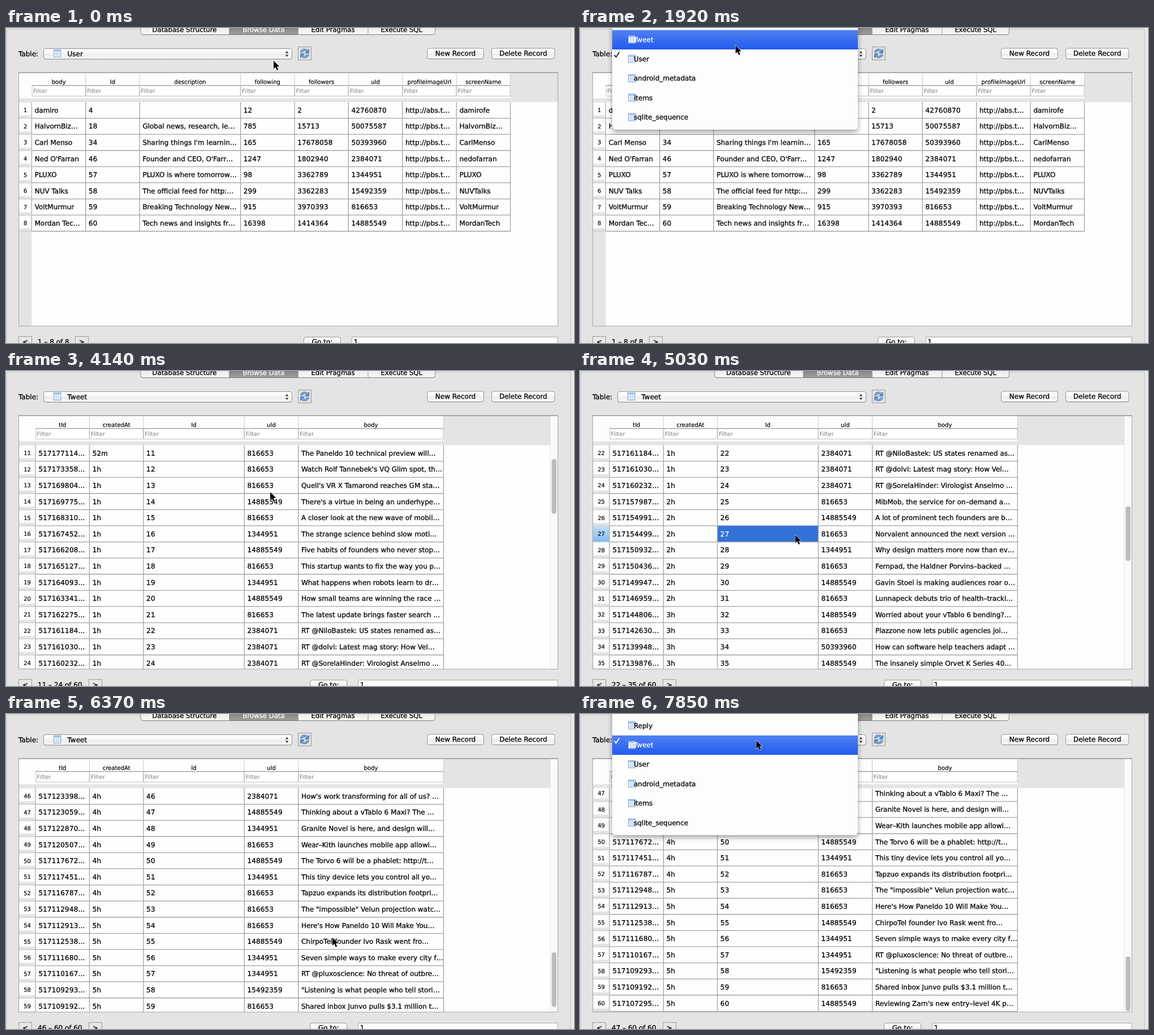
Animation, 1004 px wide and 558 px high, one loop 8 s. Source, as an HTML page:

```html
<!DOCTYPE html>
<html lang="en">
<head>
<meta charset="utf-8">
<title>Table browser</title>
<style>
  html, body { margin: 0; width: 100%; height: 100%; overflow: hidden; background: #e6e6e6; }
  svg { display: block; width: 100%; height: 100%; }
  text {
    font-family: "DejaVu Sans", "Noto Sans", sans-serif; font-size: 12px; fill: #000;
    stroke: #000; stroke-width: .28px;
    white-space: pre; text-rendering: geometricPrecision;
  }
  .small { font-size: 10.1px; stroke-width: .18px; }
  .hint { font-size: 10.1px; fill: #7c7c7c; stroke: none; }
  .num { letter-spacing: .15px; }
  .tab { font-size: 11.7px; }
  .mid { text-anchor: middle; }
  .light { fill: #fff; stroke: #fff; }
  .menu { filter: drop-shadow(0 4px 5px rgba(0, 0, 0, .38)); }
</style>
</head>
<body>
<svg viewBox="0 0 1004 558" preserveAspectRatio="none">
  <defs>
    <linearGradient id="face" x2="0" y2="1">
      <stop offset="0" stop-color="#fff"/><stop offset=".5" stop-color="#f5f5f5"/>
      <stop offset=".52" stop-color="#ececec"/><stop offset="1" stop-color="#fafafa"/>
    </linearGradient>
    <linearGradient id="dark" x2="0" y2="1">
      <stop offset="0" stop-color="#6c6c6c"/><stop offset="1" stop-color="#a0a0a0"/>
    </linearGradient>
    <linearGradient id="hot" x2="0" y2="1">
      <stop offset="0" stop-color="#4f81f2"/><stop offset="1" stop-color="#225aee"/>
    </linearGradient>
    <linearGradient id="mark" x2="0" y2="1">
      <stop offset="0" stop-color="#c0def8"/><stop offset="1" stop-color="#84baee"/>
    </linearGradient>
    <clipPath id="grid"><rect x="22" y="131" width="954" height="397"/></clipPath>
  </defs>
  <g id="scene"></g>
</svg>
<script>
const LOOP = 8000, STEP = 148, LEAD = 14;
const ROW = 28.6, TOP = 131.2, ITEM = 34.4;

const authors = {
  c: '42760870', t: '816653', f: '14885549', w: '1344951',
  o: '2384071', b: '50393960', d: '15492359'
};

const users = `damiro|4||12|2|42760870|http://abs.t…|damirofe
HalvornBiz…|18|Global news, research, le…|785|15713|50075587|http://pbs.t…|HalvornBiz…
Carl Menso|34|Sharing things I'm learnin…|165|17678058|50393960|http://pbs.t…|CarlMenso
Ned O'Farran|46|Founder and CEO, O'Farr…|1247|1802940|2384071|http://pbs.t…|nedofarran
PLUXO|57|PLUXO is where tomorrow…|98|3362789|1344951|http://pbs.t…|PLUXO
NUV Talks|58|The official feed for http:…|299|3362283|15492359|http://pbs.t…|NUVTalks
VoltMurmur|59|Breaking Technology New…|915|3970393|816653|http://pbs.t…|VoltMurmur
Mordan Tec…|60|Tech news and insights fr…|16398|1414364|14885549|http://pbs.t…|MordanTech`
  .split('\n').map(line => line.split('|'));

// id tail, age, author key, text
const tweets = `188878 5m c @damirofe he
188843 5m c @VoltMurmur hello
188683 6m c @VoltMurmur  good
188510 7m c heloo
188440 7m t Plomit CEO Darvin Kell on giving sto…
184923 21m t Another day, another –Gate. Ortavia …
184657 22m f This promised feature of Paneldo 10 …
180884 37m t Fimbley app lets you add celebrity cut…
180880 37m w Her uniform is a political statement, n…
177195 52m f The youngest woman on the #Mordan4…
177114 52m t The Paneldo 10 technical preview will…
173358 1h t Watch Rolf Tannebek's VQ Glim spot, th…
169804 1h t Quell's VR X Tamarond reaches GM sta…
169775 1h f There's a virtue in being an underhype…
168310 1h t A closer look at the new wave of mobil…
167452 1h w The strange science behind slow moti…
166208 1h f Five habits of founders who never stop…
165127 1h t This startup wants to fix the way you p…
164093 1h w What happens when robots learn to dr…
163341 1h f How small teams are winning the race …
162275 1h t The latest update brings faster search …
161184 1h o RT @NiloBastek: US states renamed as…
161030 1h o RT @dolvi: Latest mag story: How Vel…
160232 1h o RT @SorelaHinder: Virologist Anselmo …
157987 2h t MibMob, the service for on–demand a…
154991 2h f A lot of prominent tech founders are b…
154499 2h t Norvalent announced the next version …
150932 2h w Why design matters more now than ev…
150436 2h t Fernpad, the Haldner Porvins–backed …
149947 2h f Gavin Stoel is making audiences roar o…
146959 2h t Lunnapeck debuts trio of health–tracki…
144806 3h f Worried about your vTablo 6 bending?…
142630 3h t Plazzone now lets public agencies joi…
139948 3h b How can software help teachers adapt …
139876 3h f The insanely simple Orvet K Series 40…
138214 3h w A map of every sound in the deep oce…
136905 3h t The new tools that make remote work f…
135481 3h f Why patience pays off when you build …
133760 3h t A tiny camera that follows you around …
132118 3h w The hidden math inside everyday obje…
130642 3h f What investors look for in a first meeti…
129037 4h t This app turns your notes into short vi…
127553 4h w The case for slower, quieter machines …
125914 4h f Ten lessons from a year of selling onlin…
124470 4h t Another round of funding for shared ri…
123398 4h o How's work transforming for all of us? …
123059 4h f Thinking about a vTablo 6 Maxi? The …
122870 4h w Granite Novel is here, and design will…
120507 4h t Wear–Kith launches mobile app allowi…
117672 4h f The Torvo 6 will be a phablet: http://t…
117451 4h w This tiny device lets you control all yo…
116787 4h t Tapzuo expands its distribution footpri…
112948 5h t The "impossible" Velun projection watc…
112913 5h t Here's How Paneldo 10 Will Make You…
112538 5h f ChirpoTel founder Ivo Rask went fro…
111680 5h w Seven simple ways to make every city f…
110167 5h w RT @pluxoscience: No threat of outbre…
109293 5h d "Listening is what people who tell stori…
109192 5h t Shared inbox Junvo pulls $3.1 million t…
107295 5h f Reviewing Zarn's new entry–level 4K p…`
  .split('\n').map((line, i) => {
    const [, id, age, who, body] = line.match(/^(\S+) (\S+) (\S) (.*)$/);
    return [`517${id}…`, age, String(i + 1), authors[who], body];
  });

const tables = {
  User: {
    rows: users,
    names: ['body', 'Id', 'description', 'following', 'followers', 'uId', 'profileImageUrl', 'screenName'],
    edges: [45.5, 140.8, 236.2, 414.6, 510, 605.3, 700.8, 796.2, 891.6]
  },
  Tweet: {
    rows: tweets,
    names: ['tId', 'createdAt', 'Id', 'uId', 'body'],
    edges: [52.2, 147.5, 242.9, 421.2, 516.7, 773.4]
  }
};
const menuItems = ['Reply', 'Tweet', 'User', 'android_metadata', 'items', 'sqlite_sequence'];

// pointer path: step, x, y
const path = [
  [0, 473, 58], [3, 464, 46], [5, 464, 46], [9, 312, 77], [12, 279, 54], [13, 275, 31],
  [17, 275, 31], [22, 519, 169], [25, 519, 169], [33, 380.5, 290.5], [35, 380.5, 290.5],
  [39, 577, 396], [46, 577, 396], [51, 316, 50], [52, 311.5, 47]
];
// first visible row at each step from step 25 on
const scroll = [1, 3, 6, 10, 14, 17, 20, 21, 21, 21, 21, 22, 25, 28, 32, 36, 40, 43, 45, 46];

const text = (x, y, s, cls = '') => `<text x="${x}" y="${y}" class="${cls}">${s}</text>`;
const rect = (x, y, w, h, fill, more = '') =>
  `<rect x="${x}" y="${y}" width="${w}" height="${h}" fill="${fill}" ${more}/>`;
const line = (x1, y1, x2, y2, color, w = 1) =>
  `<path d="M${x1} ${y1}L${x2} ${y2}" stroke="${color}" stroke-width="${w}"/>`;

function pointerAt(n) {
  const i = path.findIndex(k => k[0] > n);
  if (i < 0) return path[path.length - 1].slice(1);
  const [a, ax, ay] = path[i - 1], [b, bx, by] = path[i];
  const p = (n - a) / (b - a);
  return [ax + (bx - ax) * p, ay + (by - ay) * p];
}

function button(x, y, w, h, label, mid = y + h / 2) {
  return rect(x, y + 1, w, h, '#c4c4c4', 'rx="4"') +
    rect(x, y, w, h, 'url(#face)', 'rx="4" stroke="#959595"') +
    text(x + w / 2, mid + 4, label, 'mid');
}

function tableIcon(x, y) {
  let s = rect(x, y, 12.5, 13, '#f4f9ff', 'stroke="#7da3cf"') + rect(x, y, 12.5, 3, '#9cc3ee');
  for (const d of [5.5, 8, 10.5]) s += line(x + 1, y + d, x + 12, y + d, '#b4cce6', .8);
  return s + line(x + 4.2, y + 3, x + 4.2, y + 13, '#a5c3e2', .8) + line(x + 8.4, y + 3, x + 8.4, y + 13, '#b4cce6', .8);
}

function refreshIcon() {
  const arcs = '<path d="M522 43.5a6.2 6.2 0 0 1 10.5-2.8M534 46.5a6.2 6.2 0 0 1-10.5 2.8" fill="none"';
  return arcs + ' stroke="#3d6ca8" stroke-width="4"/>' +
    '<path d="M535.4 37.6v6.8h-6.8zM520.6 52.4v-6.8h6.8z" fill="#5b8fd0" stroke="#3d6ca8" stroke-width=".8"/>' +
    arcs + ' stroke="#8db6e6" stroke-width="2"/>';
}

function backdrop() {
  return rect(0, 0, 1004, 558, '#e9e9e9') + rect(1, 2, 997, 560, '#e4e4e4', 'stroke="#c2c2c2"');
}

function tabs() {
  const seg = [[238, 395, 'Database Structure'], [395, 516, 'Browse Data'], [516, 640, 'Edit Pragmas'], [640, 758.5, 'Execute SQL']];
  let s = rect(238, -9, 520.5, 21.5, '#bbb', 'rx="4"') + rect(238, -10, 520.5, 21.5, 'url(#face)', 'rx="4" stroke="#8e8e8e"');
  seg.forEach(([a, b, name], i) => {
    if (i === 1) s += rect(a, -10, b - a, 21.5, 'url(#dark)', 'stroke="#707070"');
    else if (i) s += line(a, -10, a, 11.5, '#9a9a9a');
    s += text((a + b) / 2 - (i ? 0 : 1), 7, name, 'tab mid' + (i === 1 ? ' light' : ''));
  });
  return s;
}

function toolbar(table, ring) {
  let s = text(22, 49.5, 'Table:');
  if (ring) s += rect(66.5, 36.5, 438.5, 18.5, 'none', 'rx="4" stroke="#79aee2" stroke-width="4"');
  s += rect(66.5, 37.5, 439, 18.5, '#bdbdbd', 'rx="4"') +
    rect(66.5, 36.5, 439, 18.5, 'url(#face)', `rx="4" stroke="${ring ? '#6f9fd0' : '#929292'}"`) +
    tableIcon(84.5, 38.5) + text(108.5, 49.5, table) +
    '<path d="M493.8 44.6l2.7-3.8 2.7 3.8zM493.8 47.4l2.7 3.8 2.7-3.8z" fill="#333"/>' +
    rect(516.5, 33.5, 23, 23, '#e2e2e2', 'stroke="#9b9b9b"') + refreshIcon();
  return s + button(744.5, 36, 100, 18.5, 'New Record') + button(858.5, 36, 111.5, 18.5, 'Delete Record');
}

function header({ names, edges }) {
  const end = edges[names.length];
  let s = rect(22.5, 79, 953, 52.2, '#e4e4e4') + rect(23, 79, end - 23, 45.5, '#fdfdfd');
  names.forEach((name, i) => {
    const x = edges[i], w = edges[i + 1] - x;
    s += line(x + w, 81, x + w, 101, '#c9c9c9') +
      text(x + w / 2, 99, name, 'small mid') +
      rect(x + .7, 102, w - 1.2, 18.5, '#fff', 'stroke="#c0c0c0"') +
      line(x + .5, 101.8, x + w, 101.8, '#9a9a9a') +
      text(x + 2.4, 115.4, 'Filter', 'hint');
  });
  return s;
}

function grid({ rows, names, edges }, top, picked) {
  const left = edges[0], end = edges[names.length];
  const shift = top === 46 ? 5 : 0;
  let s = rect(22.5, TOP, 953, 397, '#fefefe') + rect(22.5, TOP, left - 22.5, 397, '#e4e4e4');
  const last = Math.min(rows.length, top + 15);
  for (let i = top; i < last; i++) {
    const y = TOP + (i - top) * ROW - shift, base = y + 18.6, on = i === picked;
    s += on ? rect(23, y + .5, left - 23, ROW - 1, 'url(#mark)') : rect(23.5, y + 1, left - 25, 22.5, '#fdfdfd');
    s += line(23, y + ROW, left, y + ROW, '#c6c6c6') + text((23 + left) / 2, y + 18, i + 1, 'small mid');
    if (on) s += rect(edges[2], y, edges[3] - edges[2], ROW, '#3272d9');
    s += line(left, y + ROW, end, y + ROW, '#a2a2a2', 1.3);
    rows[i].forEach((v, c) => {
      const cls = (/^\d/.test(v) ? 'num' : '') + (on && c === 2 ? ' light' : '');
      s += text(edges[c] + 5.2, base, v, cls);
    });
  }
  const foot = Math.min(528, TOP + (last - top) * ROW - shift);
  edges.forEach((x, i) => { s += line(x, TOP, x, foot, i ? '#a2a2a2' : '#b8b8b8', 1.3); });
  return `<g clip-path="url(#grid)">${s}</g>`;
}

function scrollbar(top) {
  return rect(962, 79, 13.5, 449, '#fafafa') + line(962, 79, 962, 528, '#e3e3e3') +
    rect(964.5, 80 + 7.6 * top, 8.5, 97, '#bdbdbd', 'rx="4.2"');
}

function footer(count, top) {
  const to = count < 14 ? count : top > 44 ? count : top + 14;
  const label = `${top + 1} – ${to} of ${count}`;
  const grow = (label.length - 10) * 8, half = grow * .47;
  const square = (x, s) => rect(x, 546.5, 23, 24, '#e6e6e6', 'stroke="#9d9d9d"') + text(x + 11.5, 560, s, 'mid');
  return square(22.5, '&lt;') + text(56, 560, label) + square(122.5 + grow, '&gt;') +
    button(526.5 + half, 547.5, 65, 19, 'Go to:', 556) +
    rect(611.5 + half, 547.5, 363.5 - half, 20, '#fff', 'stroke="#a8a8a8"') +
    text(614.5 + half, 560, '1');
}

function menu(table, py) {
  const first = table === 'User' ? 1 : 0;
  const hover = Math.floor((py - 3.8) / ITEM);
  const bottom = 25 + ITEM * (menuItems.length - 1 - first) + 17.4;
  let s = rect(57, -30, 434, bottom + 30, '#fdfdfd', 'rx="5" class="menu"');
  menuItems.forEach((name, i) => {
    const slot = i - first, mid = 20.2 + ITEM * slot, on = slot === hover;
    if (on) s += rect(57, mid - 16.6, 434, ITEM, 'url(#hot)');
    if (name === table) {
      s += `<path d="M60.5 ${mid - 7}l3.2 4 6-9" fill="none" stroke="${on ? '#fff' : '#222'}" stroke-width="1.8"/>`;
    }
    s += tableIcon(85.5, mid - 6.5) + text(95, mid + 4.4, name, on ? 'light' : '');
  });
  return s;
}

function pointer(x, y) {
  return `<path transform="translate(${x} ${y})" d="M0 0V14.2L3.3 11.2 5.8 16.8 8.2 15.7 5.8 10.3H10.2Z" stroke="#fff" stroke-width="1.1" paint-order="stroke"/>`;
}

function draw(n) {
  const name = n < 17 ? 'User' : 'Tweet', table = tables[name];
  const top = n < 25 ? 0 : scroll[Math.min(n - 25, scroll.length - 1)];
  const open = (n >= 5 && n < 17) || n >= 52;
  const [px, py] = pointerAt(n);
  return backdrop() + tabs() + toolbar(name, n >= 17 && n < 28) +
    grid(table, top, n >= 33 ? 26 : -1) + header(table) +
    (name === 'Tweet' ? scrollbar(top) : '') +
    rect(22.5, 79, 953, 449, 'none', 'stroke="#a6a6a6"') + line(22, 79, 976, 79, '#8c8c8c') +
    footer(table.rows.length, top) + (open ? menu(name, py) : '') + pointer(px, py);
}

const scene = document.getElementById('scene');
let shown = -1;
function tick() {
  const n = Math.floor((performance.now() % LOOP + LEAD) / STEP);
  if (n !== shown) scene.innerHTML = draw(shown = n);
  requestAnimationFrame(tick);
}
tick();
</script>
</body>
</html>
```
